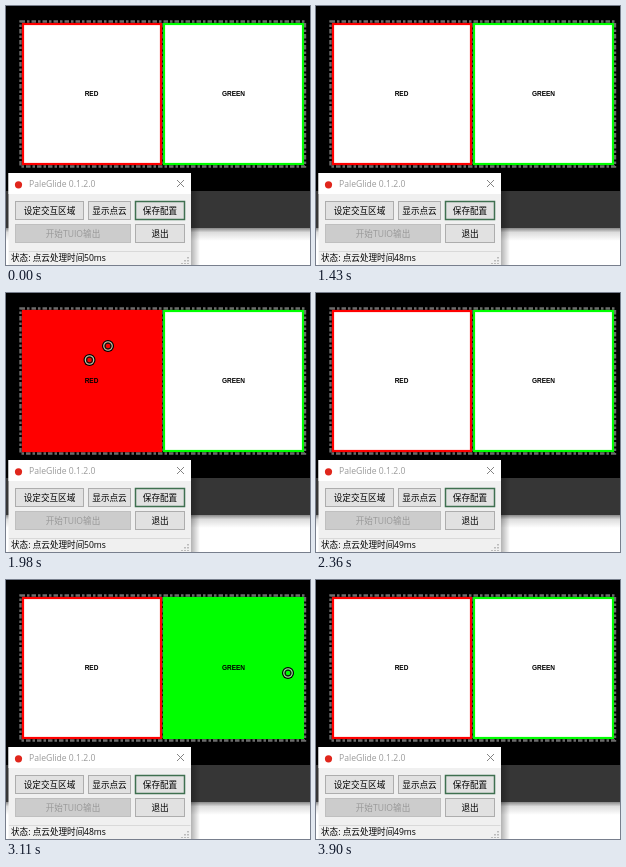
An HTML page for the animation above (3970 ms loop, 304 by 259 pixels).

```html
<!DOCTYPE html>
<html lang="zh">
<head>
<meta charset="utf-8">
<title>Touch zones</title>
<style>
  html, body { margin: 0; width: 100%; height: 100%; overflow: hidden; background: #000; }
  svg { display: block; width: 100vw; height: 100vh; }
  text { font: 8.6px "Open Sans", "Noto Sans CJK SC", "Noto Sans CJK", sans-serif; fill: #000; }
  .label { font: bold 6.5px "Liberation Sans", sans-serif; text-anchor: middle; }
  .button rect { fill: #e1e1e1; stroke: #adadad; }
  .button text { text-anchor: middle; font-weight: 500; }
  .focus rect { stroke: #3f7050; stroke-width: 1.5; }
  .disabled rect { fill: #ccc; stroke: #bfbfbf; }
  .disabled text { fill: #999; }
  .zone { stroke-width: 2.2; }
  .marks { fill: none; stroke: #6c6c6c; stroke-width: 2.4; stroke-dasharray: 4.5 2 2.5 2; }
</style>
</head>
<body>
<svg viewBox="0 0 304 259" preserveAspectRatio="none">
  <defs>
    <linearGradient id="fade" x2="0" y2="1">
      <stop stop-color="#888"/>
      <stop offset=".12" stop-color="#ddd"/>
      <stop offset=".35" stop-color="#fff"/>
    </linearGradient>
    <linearGradient id="shadow">
      <stop stop-color="#000" stop-opacity=".3"/>
      <stop offset="1" stop-color="#000" stop-opacity="0"/>
    </linearGradient>
  </defs>
  <rect width="304" height="259"/>
  <rect y="185" width="304" height="37" fill="#363636"/>
  <rect y="222" width="304" height="37" fill="url(#fade)"/>
  <rect x="185" y="185" width="9" height="74" fill="url(#shadow)"/>

  <rect class="marks" x="14.5" y="15.5" width="284.5" height="145"/>
  <rect id="red" class="zone" x="17" y="18" width="138" height="140" stroke="#f00"/>
  <rect id="green" class="zone" x="158" y="18" width="139" height="140" stroke="#0f0"/>
  <path class="marks" d="M156.6 17V160" style="stroke-width:.8"/>
  <text class="label" x="85.5" y="90">RED</text>
  <text class="label" x="227.5" y="90">GREEN</text>
  <g id="touches"></g>

  <rect x="2.5" y="167" width="182.5" height="92" fill="#f0f0f0"/>
  <rect x="2.5" y="167" width="182.5" height="21" fill="#fff"/>
  <circle cx="12.5" cy="178.8" r="3.6" fill="#e0261c"/>
  <text x="23" y="181" style="fill:#999">PaleGlide 0.1.2.0</text>
  <path d="M171 174l7 7m0-7l-7 7" stroke="#777" stroke-width=".9"/>
  <g id="buttons"></g>
  <path d="M3 245.5H184.5" stroke="#d9d9d9"/>
  <text x="5" y="255.3">状态: 点云处理时间</text>
  <text id="elapsed" x="78" y="255.3"></text>
  <path d="M182 251v7M179 254v4M176 257v1" stroke="#aaa" stroke-width="1.5" stroke-dasharray="1.5 1.5"/>
</svg>
<script>
const LOOP = 3970;
const byId = id => document.getElementById(id);

function add(parent, tag, attrs, text = "") {
  const node = document.createElementNS(parent.namespaceURI, tag);
  for (const key in attrs) node.setAttribute(key, attrs[key]);
  node.textContent = text;
  return parent.appendChild(node);
}

function button(x, y, width, label, kind = "") {
  const group = add(byId("buttons"), "g", { class: "button " + kind });
  add(group, "rect", { x: x + .5, y: y + .5, width, height: 18 });
  add(group, "text", { x: x + width / 2 + .5, y: y + 13 }, label);
}
button(9, 195, 68, "设定交互区域");
button(82, 195, 42, "显示点云");
button(129, 195, 49, "保存配置", "focus");
button(9, 218, 115, "开始TUIO输出", "disabled");
button(129, 218, 49, "退出");

const colors = { red: "#f00", green: "#0f0" };

// Each finger slides in by (dx, dy), rests at (x, y) and leaves the same way.
const touches = [
  { zone: "green", start: 300, end: 1060, x: 270, y: 116, dx: -27, dy: 4 },
  { zone: "red", start: 1540, end: 2140, x: 83.5, y: 67, dx: 3, dy: 42 },
  { zone: "red", start: 1540, end: 2140, x: 102, y: 53, dx: 3, dy: 28 },
  { zone: "green", start: 2590, end: 3250, x: 282, y: 93, dx: -15, dy: -5 }
];
for (const touch of touches) {
  touch.node = add(byId("touches"), "g", {});
  add(touch.node, "circle", { r: 6, fill: "#000" });
  add(touch.node, "circle", { r: 4.2, fill: colors[touch.zone], stroke: "#a9c9a9", "stroke-width": 1.3 });
  add(touch.node, "circle", { r: 2.9, fill: "none", stroke: "#111", "stroke-width": 1.2 });
}

function place({ node, start, end, x, y, dx, dy }, t) {
  const active = t >= start && t < end;
  node.setAttribute("visibility", active ? "visible" : "hidden");
  if (active) {
    const reach = Math.min(1, 2.2 * Math.sin(Math.PI * (t - start) / (end - start)));
    node.setAttribute("transform", `translate(${x - dx * (1 - reach)} ${y - dy * (1 - reach)})`);
  }
  return active;
}

// The reading wanders between 48 and 50 ms as the cycle beats against the frame rate.
function reading(t) {
  const phase = Math.floor(t / 33.1) * .3045 + .998;
  return 48 + Math.floor(phase % 1 * 3);
}

function draw(now) {
  const t = now % LOOP;
  const lit = new Set(touches.filter(touch => place(touch, t)).map(touch => touch.zone));
  for (const zone in colors) {
    byId(zone).setAttribute("fill", lit.has(zone) ? colors[zone] : "#fff");
  }
  byId("elapsed").textContent = reading(t) + "ms";
}

const start = performance.now();
function tick() {
  draw(performance.now() - start);
  requestAnimationFrame(tick);
}
tick();
</script>
</body>
</html>
```
